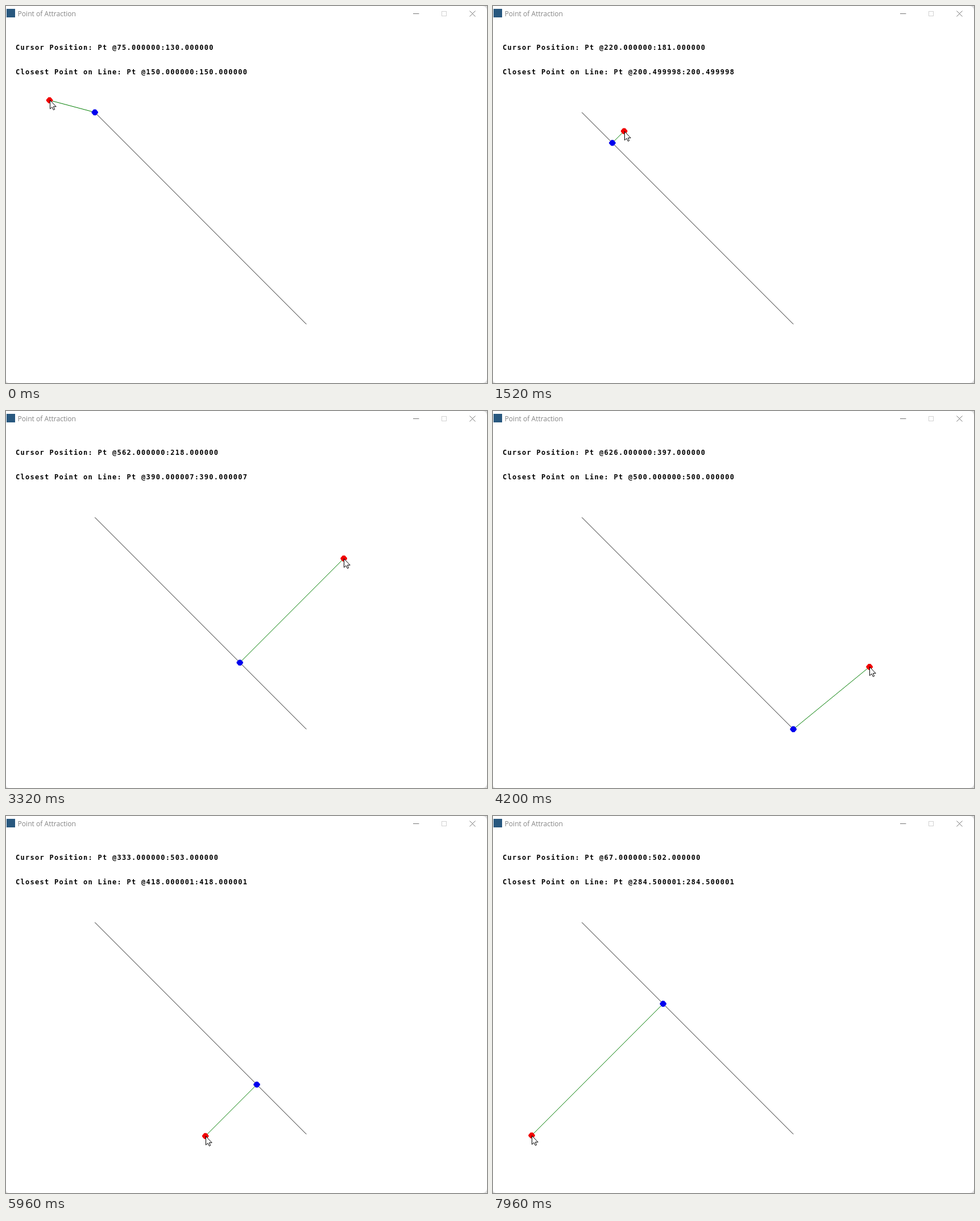
Recreate the animation shown at these times as an HTML page. Size 846x662 px, loop 8000 ms.

```html
<!DOCTYPE html>
<html lang="en">
<head>
<meta charset="utf-8">
<title>Point of Attraction</title>
<style>
  html, body { margin: 0; width: 100%; height: 100%; overflow: hidden; background: #dedede; }
  svg { display: block; width: 846px; height: 662px; background: #fff; border-radius: 0 8px 8px 5px; }
  .title { font: 12.1px "Open Sans", sans-serif; fill: #858585; }
  .readout { font: bold 12px "DejaVu Sans Mono", monospace; letter-spacing: 1.28px; white-space: pre; }
</style>
</head>
<body>
<svg viewBox="0 0 846 662">
  <defs>
    <clipPath id="client"><rect y="27" width="846" height="635"/></clipPath>
    <path id="dot" d="M-5.7-1 L-2-5.2 H2 L5.7-1 V1 L2 5.2 H-2 L-5.7 1Z"/>
  </defs>
  <rect x="1" y="5" width="15" height="15" fill="#28587f"/>
  <text class="title" x="20.5" y="18">Point of Attraction</text>
  <g fill="none" stroke="#777">
    <path d="M716 13.5h10.5"/>
    <rect x="766.5" y="9.5" width="8" height="8" stroke="#d2d2d2"/>
    <path d="M815.5 8.5l10 10m0-10l-10 10"/>
  </g>
  <text class="readout" id="cursorText" x="17" y="77"></text>
  <text class="readout" id="closestText" x="17" y="119.5"></text>
  <g clip-path="url(#client)">
    <line id="segment" stroke="#000" stroke-width=".9"/>
    <line id="link" stroke="#007d00"/>
    <use id="closest" href="#dot" fill="#00e"/>
    <use id="marker" href="#dot" fill="#f00000"/>
  </g>
  <path id="pointer" d="M0 0V15.2L3.5 12L6 17L8.2 16L5.9 11.2H10.7Z" fill="#fff" stroke="#000"/>
</svg>
<script>
const LOOP = 8000, STEP = 40, START = 150, END = 500;
// Mouse route: time in ms, then window coordinates; negative y is the title bar.
const route = [
  [0, 75, 130], [400, 92, 228], [800, 150, 338], [1160, 205, 310], [1600, 222, 150],
  [2000, 228, 0], [2160, 285, -23], [2360, 387, -23.6], [2600, 450, -8], [2920, 515, 95],
  [3320, 562, 218], [4140, 626, 385], [4960, 566, 534], [5400, 469, 543],
  [5960, 333, 503], [6600, 223, 514], [7200, 139, 505], [7600, 93, 500], [7960, 67, 502]
];
const el = id => document.getElementById(id);
const toX = x => x * 1.0629 - 3.2;
const toY = y => y * 1.0629 + 27.3;

function slope(i, axis) {
  const a = route[i - 1], b = route[i + 1];
  return a && b ? (b[axis] - a[axis]) / (b[0] - a[0]) : 0;
}

function mouseAt(time) {
  const t = Math.min(time, route.at(-1)[0]);
  const i = Math.max(0, route.findIndex(p => p[0] >= t) - 1);
  const a = route[i], b = route[i + 1], span = b[0] - a[0], u = (t - a[0]) / span;
  return [1, 2].map(axis =>
    a[axis] * (1 + 2 * u) * (1 - u) ** 2 + b[axis] * u * u * (3 - 2 * u) +
    span * u * (1 - u) * (slope(i, axis) * (1 - u) - slope(i + 1, axis) * u));
}

// The marker keeps its last place while the mouse is outside the client area.
let held = [75, 130];
const poses = Array.from({ length: LOOP / STEP }, (_, i) => {
  const mouse = mouseAt(i * STEP);
  if (mouse[1] > -0.01) held = mouse.map(v => Math.max(0, Math.round(v)));
  return { mouse, marker: held };
});

function setLine(node, x1, y1, x2, y2) {
  const ends = { x1: toX(x1), y1: toY(y1), x2: toX(x2), y2: toY(y2) };
  for (const key in ends) node.setAttribute(key, ends[key]);
}
function place(node, x, y) {
  node.setAttribute("transform", `translate(${toX(x)} ${toY(y)})`);
}
const label = (x, y) => `Pt @${x.toFixed(6)}:${y.toFixed(6)}`;

function draw(now) {
  const { mouse, marker: [x, y] } = poses[Math.floor((now % LOOP) / STEP)];
  const ratio = Math.fround(((x + y) / 2 - START) / (END - START));
  const near = START + (END - START) * Math.min(1, Math.max(0, ratio));
  el("cursorText").textContent = "Cursor Position: " + label(x, y);
  el("closestText").textContent = "Closest Point on Line: " + label(near, near);
  setLine(el("link"), x, y, near, near);
  place(el("marker"), x, y);
  place(el("closest"), near, near);
  el("pointer").setAttribute("transform",
    `translate(${Math.round(toX(mouse[0])) + 0.5} ${Math.round(toY(mouse[1])) + 0.5})`);
}

setLine(el("segment"), START, START, END, END);
const began = performance.now();
function tick() {
  draw(performance.now() - began);
  requestAnimationFrame(tick);
}
tick();
</script>
</body>
</html>
```
